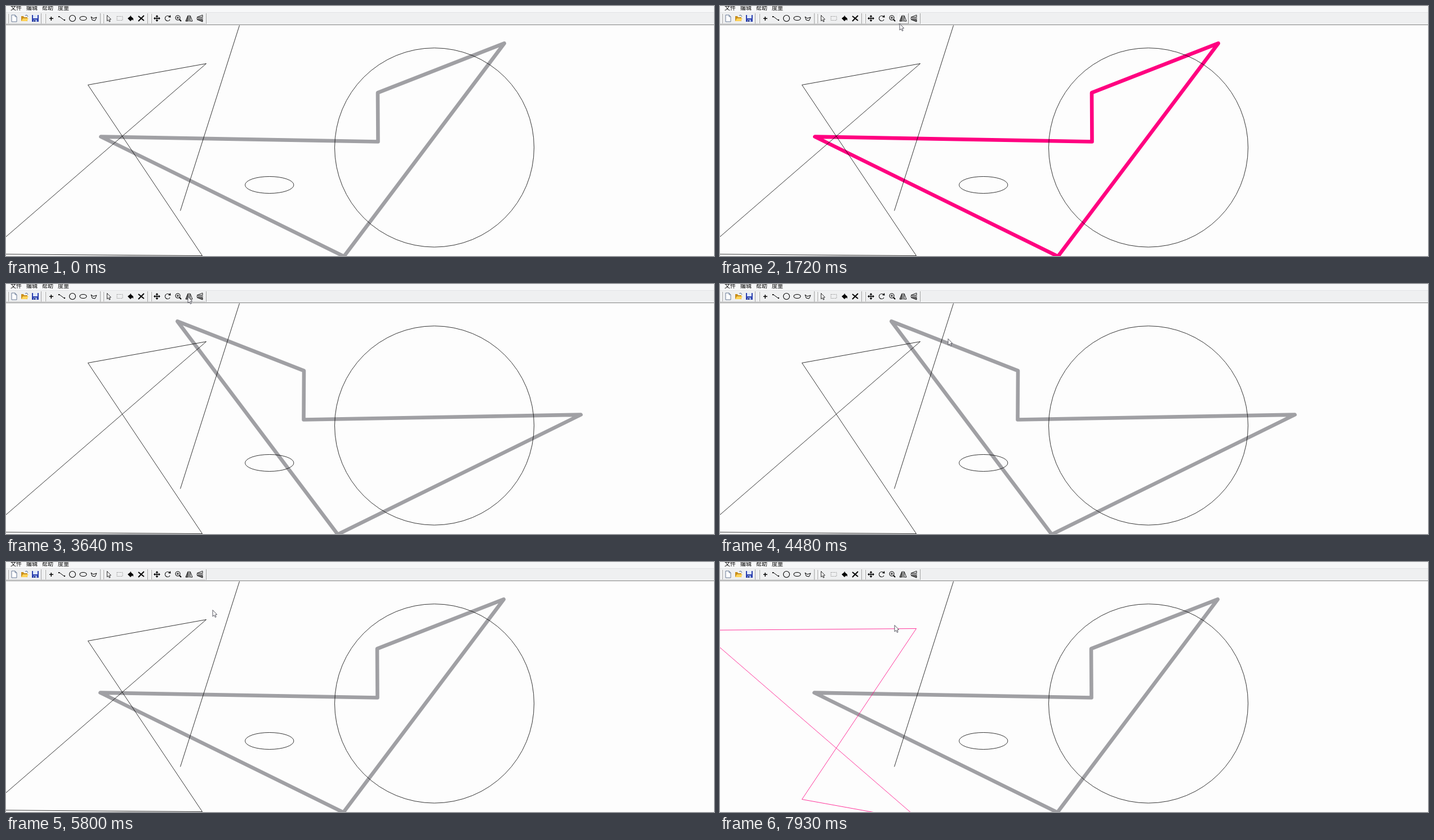
An HTML page with a canvas that plays this animation: 1257 by 445 pixels, repeating every 8000 ms.

```html
<!DOCTYPE html>
<html lang="zh">
<head>
<meta charset="utf-8">
<style>
html, body { margin: 0; width: 100%; height: 100%; overflow: hidden; background: #fdfdfd; }
canvas { display: block; }
</style>
</head>
<body>
<canvas id="stage" width="1257" height="445"></canvas>
<script>
const ctx = document.getElementById('stage').getContext('2d');
const W = 1257, H = 445, LOOP = 8000, STEP = 30;
const PINK = '#ff0080', GRAY = '#a0a0a4', INK = '#000';
const FONT = '10px "Noto Sans CJK SC", "Noto Sans CJK", sans-serif';

const zigzag = [[168.4, 232.6], [660.5, 241.5], [660, 154.4], [884.7, 66.4], [600, 445.7]];
const bowtie = [[145, 140], [355, 102], [-36, 441], [348, 444]];
const mirrorX = (points, sum) => points.map(([x, y]) => [sum - x, y]);
const mirrorY = (points, sum) => points.map(([x, y]) => [x, sum - y]);
const zigzagFlipped = mirrorX(zigzag, 1189);
const zigzagBack = mirrorX(zigzagFlipped, 1188);
const bowtieFlipped = mirrorY(bowtie, 562);

// Each pointer move eases along a curve to its end point, bent towards `via`
const entry = [1230, 37];
const moves = [
  { start: 340, end: 790, to: [845, 135] },
  { start: 940, end: 1060, to: [834, 135] },
  { start: 1300, end: 1720, to: [319, 31], via: [576, 170] },
  { start: 1720, end: 1960, to: [308, 22] },
  { start: 2080, end: 2140, to: [323, 22] },
  { start: 4210, end: 4540, to: [413, 104] },
  { start: 4660, end: 4960, to: [320, 25] },
  { start: 5380, end: 5800, to: [367, 85], via: [365, 40] },
  { start: 5800, end: 5920, to: [298, 106] },
  { start: 6250, end: 6880, to: [343, 21], via: [340, 26] },
  { start: 7540, end: 7930, to: [310, 112], via: [360, 55] }
];

function pointerAt(t) {
  if (t < 100) return null;
  const now = Math.floor((t - 10) / STEP) * STEP + 10;
  let from = entry;
  for (const { start, end, to, via } of moves) {
    if (now < start) break;
    const u = Math.min(1, (now - start) / (end - start));
    const k = u * u * (3 - 2 * u);
    const origin = from;
    from = to.map((v, i) => {
      const bend = via ? via[i] : (origin[i] + v) / 2;
      return Math.round((1 - k) ** 2 * origin[i] + 2 * k * (1 - k) * bend + k * k * v);
    });
  }
  return from;
}

function rect(x, y, w, h, color) {
  ctx.fillStyle = color;
  ctx.fillRect(x, y, w, h);
}

function path(points, closed) {
  ctx.beginPath();
  points.forEach(([x, y]) => ctx.lineTo(x, y));
  if (closed) ctx.closePath();
}

function stroke(points, closed, width = 1, color = INK) {
  path(points, closed);
  ctx.lineWidth = width;
  ctx.strokeStyle = color;
  ctx.stroke();
}

function fill(points, color = INK) {
  path(points, true);
  ctx.fillStyle = color;
  ctx.fill();
}

function oval(cx, cy, rx, ry, width = 1.1, from = 0, to = 2 * Math.PI) {
  ctx.beginPath();
  ctx.ellipse(cx, cy, rx, ry, 0, from, to);
  ctx.lineWidth = width;
  ctx.strokeStyle = INK;
  ctx.stroke();
}

function arrow(x, y, scale, color) {
  const shape = [[0, 0], [0, 12], [2.7, 9.6], [4.6, 13.6], [6.4, 12.9], [4.7, 8.9], [8, 8.5]];
  ctx.save();
  ctx.translate(x, y + 0.5);
  ctx.scale(scale, scale);
  fill(shape, '#fff');
  stroke(shape, true, 1, color);
  ctx.restore();
}

// Icons are drawn around their own centre
function pageIcon() {
  const page = [[-4, -6], [2, -6], [5, -3], [5, 6], [-4, 6]];
  fill(page, '#fff');
  stroke(page, true, 1, '#667894');
  stroke([[2, -6], [2, -3], [5, -3]], false, 1, '#667894');
}

function folderIcon() {
  fill([[-6, -4], [-2, -4], [-1, -2], [5, -2], [5, 5], [-6, 5]], '#c98f1c');
  fill([[-6, 5], [-3, 0], [7, 0], [4, 5]], '#ffd45a');
  stroke([[1, -5], [4, -6], [6, -3]], false, 1, '#4f6a94');
}

function diskIcon() {
  rect(-6, -6, 12, 12, '#2b3fae');
  rect(-4, -6, 8, 6, '#dfe9fb');
  rect(-3, 2, 6, 4, '#9eb4e8');
  rect(-2, 3, 2, 3, '#1c2875');
}

function pointIcon() {
  rect(-3, -0.5, 7, 1.5, INK);
  rect(-0.5, -3, 1.5, 7, INK);
}

function lineIcon() {
  stroke([[-4, -3], [4, 3]], false);
  rect(-6, -4, 2, 2, INK);
  rect(4, 2, 2, 2, INK);
}

function polygonIcon() {
  stroke([[-5, -3], [-1, 0], [5, -2], [2, 4], [-3, 3]], true);
}

function selectIcon() {
  ctx.setLineDash([1.5, 1.5]);
  stroke([[-5, -3.5], [5, -3.5], [5, 3.5], [-5, 3.5]], true, 1, '#888');
  ctx.setLineDash([]);
}

function bucketIcon() {
  fill([[-5, 0], [0, -4], [5, 0], [5, 4], [3, 2], [0, 5]]);
  stroke([[0, -5], [2, 0]], false);
}

function deleteIcon() {
  stroke([[-5, -4], [5, 4]], false, 2);
  stroke([[5, -5], [-5, 5]], false, 2);
}

function moveIcon() {
  for (let i = 0; i < 4; i++) {
    fill([[0, -6], [-2.5, -3], [2.5, -3]]);
    stroke([[0, 0], [0, -4]], false, 1.4);
    ctx.rotate(Math.PI / 2);
  }
}

function rotateIcon() {
  oval(0, 0, 4.5, 4.5, 1.1, 0.5, 5.4);
  fill([[1, -2], [5.5, -1.5], [5, -6]]);
}

function zoomIcon() {
  ctx.translate(-1, -1);
  oval(0, 0, 4, 4);
  stroke([[-2, 0], [2, 0]], false);
  stroke([[0, -2], [0, 2]], false);
  stroke([[3, 3], [6, 6]], false, 2);
}

function mirrorIcon() {
  const half = [[-2, -5], [-2, 5], [-6, 5]];
  fill(half, '#777');
  stroke(half, true, 0.9);
  stroke(mirrorX(half, 0), true, 0.9);
  stroke([[0, -6], [0, 6]], false, 0.8);
}

function flipIcon() {
  ctx.rotate(-Math.PI / 2);
  mirrorIcon();
}

const PITCH = 19.2;
const toolGroups = [
  { x: 14, icons: [pageIcon, folderIcon, diskIcon] },
  { x: 80, icons: [pointIcon, lineIcon, () => oval(0, 0, 5.5, 5.5), () => oval(0, 0, 6, 3.5), polygonIcon] },
  { x: 183, icons: [() => arrow(-3.5, -6, 0.85, INK), selectIcon, bucketIcon, deleteIcon] },
  { x: 268, icons: [moveIcon, rotateIcon, zoomIcon, mirrorIcon, flipIcon] }
];

function drawButton(x, icon, raised) {
  if (raised) {
    rect(x - 9, 13, 19, 1, '#fff');
    rect(x - 9, 13, 1, 19, '#fff');
    rect(x - 9, 31, 19, 1, '#909090');
    rect(x + 9, 13, 1, 19, '#909090');
  }
  ctx.save();
  ctx.translate(x, 22);
  icon();
  ctx.restore();
}

function drawToolbar(pointer, hoverOn) {
  rect(0, 0, W, 12, '#f7f8f9');
  rect(0, 11, W, 1, '#e2e3e5');
  rect(0, 12, W, 21, '#eff0f1');
  rect(0, 31, 354, 1, '#c2c2c2');
  rect(0, 33, W, 1, '#828282');
  ctx.font = FONT;
  ctx.fillStyle = INK;
  ['文件', '编辑', '帮助', '度量'].forEach((label, i) => ctx.fillText(label, 8 + 28 * i, 6.5));

  for (const { x, icons } of toolGroups) {
    const left = x - 11, right = Math.round(x + PITCH * (icons.length - 1)) + 10;
    rect(left, 14, 1, 17, '#fff');
    rect(left + 1, 14, 1, 17, '#a5a5a5');
    rect(right, 13, 1, 19, '#a5a5a5');
    icons.forEach((icon, i) => {
      const cx = Math.floor(x + PITCH * i);
      const over = pointer && Math.abs(pointer[0] - cx) < 9.5 && pointer[1] > 12 && pointer[1] < 32;
      drawButton(cx, icon, over && hoverOn);
    });
  }
}

function drawTip(start, end, t) {
  if (t < start || t >= end) return;
  ctx.globalAlpha = Math.min(1, (Math.floor((t - start) / STEP) + 1) / 5);
  rect(337, 54, 108, 19, '#767676');
  rect(338, 55, 106, 17, '#fff');
  ctx.font = FONT;
  ctx.fillStyle = '#575757';
  ctx.fillText('将图形作水平镜像翻转', 341, 67);
  ctx.globalAlpha = 1;
}

function drawShapes(t) {
  const thick = t < 2620 ? zigzag : t < 5350 ? zigzagFlipped : zigzagBack;
  const picked = (t >= 1090 && t < 2620) || (t >= 4510 && t < 5350);
  ctx.lineJoin = 'round';
  stroke(thick, true, 6.6, picked ? PINK : GRAY);
  ctx.lineJoin = 'miter';

  const HAIR = 0.8;
  ctx.save();
  ctx.translate(0.5, 0.5);
  stroke([[414, 34], [309, 364]], false, HAIR);
  oval(760, 251.4, 177, 177.2, HAIR);
  oval(467.2, 318, 43.2, 15, HAIR);
  stroke(t < 7480 ? bowtie : bowtieFlipped, true, HAIR, t >= 6250 ? PINK : INK);
  ctx.restore();
}

function drawScene(t) {
  const pointer = pointerAt(t);
  rect(0, 0, W, H, '#fdfdfd');
  drawShapes(t);
  drawToolbar(pointer, t < 2620 || t >= 3700);
  drawTip(2110, 2470, t);
  drawTip(5110, 5260, t);
  if (pointer) arrow(...pointer, 0.95, '#4a4a55');
}

const begin = performance.now();
function tick() {
  drawScene((performance.now() - begin) % LOOP);
  requestAnimationFrame(tick);
}
tick();
</script>
</body>
</html>
```
